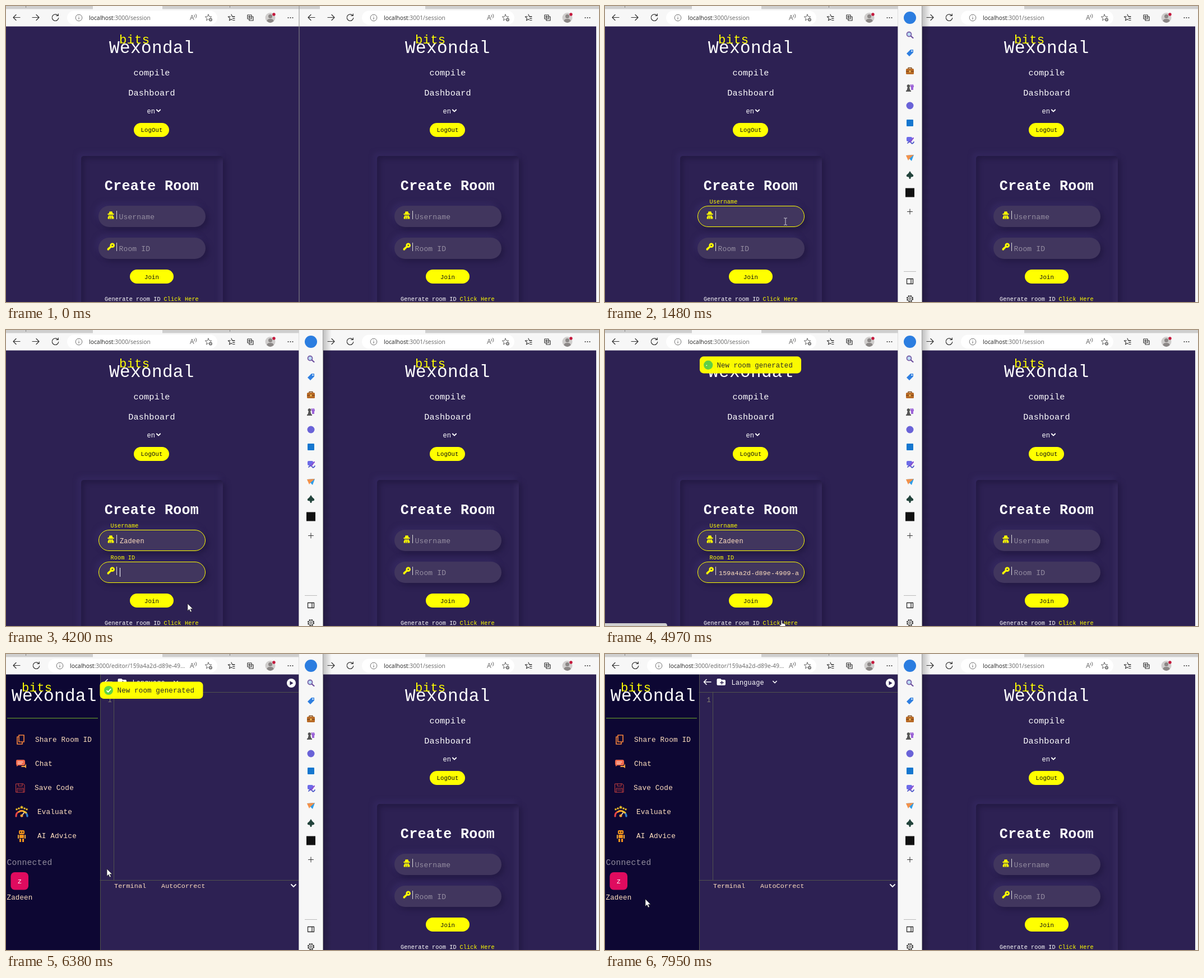
Animation, 1058 px wide and 529 px high, one loop 8 s. Source, as an HTML page:

```html
<!DOCTYPE html>
<html lang="en">
<head>
<meta charset="utf-8">
<title>Create Room</title>
<style>
html, body { margin: 0; width: 1058px; height: 529px; overflow: hidden; background: #2d2153; }
svg { position: absolute; left: 0; top: 0; overflow: hidden; }
text { font-family: "Liberation Mono", "Noto Sans Mono", monospace; letter-spacing: .012em; white-space: pre; }
.ui { font-family: "Open Sans", "Noto Sans", sans-serif; letter-spacing: 0; }
.page { position: absolute; top: 0; width: 523px; height: 529px; overflow: hidden; background: #2d2153; }
.card, .pill { position: absolute; box-sizing: border-box; }
.card { left: 134px; top: 268px; width: 253px; height: 330px; border-radius: 5px;
  box-shadow: inset 5px 5px 8px #241a45, inset -5px -5px 10px #392d61, 5px 5px 10px #241a45, -5px -5px 10px #352960; }
.pill { left: 165px; width: 191px; height: 38px; border-radius: 19px; background: #41365e; border: 1px solid transparent;
  box-shadow: 5px 5px 10px #241a45, -5px -5px 10px #352960; }
</style>
</head>
<body>
<script>
const YELLOW = '#ffff00', PEACH = '#ffdfbf', USER = 'Zadeen', ROOM = '159a4a2d-d89e-4909-a';
const GREY = [150, 143, 162];

const text = (x, y, s, size, fill = '#fff', more = '') =>
  `<text x="${x}" y="${y}" font-size="${size}" fill="${fill}" ${more}>${s}</text>`;
const centred = (x, y, s, size, fill, more = '') => text(x, y, s, size, fill, 'text-anchor="middle" ' + more);
const rect = (x, y, w, h, fill, r = 0, more = '') =>
  `<rect x="${x}" y="${y}" width="${w}" height="${h}" rx="${r}" fill="${fill}" ${more}/>`;
const disc = (x, y, r, fill) => `<circle cx="${x}" cy="${y}" r="${r}" fill="${fill}"/>`;
const fillPath = (d, fill) => `<path d="${d}" fill="${fill}"/>`;
const stroke = (d, color = '#333', width = 1.2) =>
  `<path d="${d}" fill="none" stroke="${color}" stroke-width="${width}" stroke-linecap="round" stroke-linejoin="round"/>`;
const at = (x, y, body) => `<g transform="translate(${x} ${y})">${body}</g>`;
const chevron = (x, y, w = 1.8) => stroke(`M${x - 3.2} ${y - 1.5}l3.2 3.2l3.2-3.2`, '#fff', w);
const star = r => 'M' + Array.from({ length: 10 }, (_, i) => {
  const a = Math.PI * (i / 5 - .5), k = i % 2 ? r * .45 : r;
  return (k * Math.cos(a)).toFixed(2) + ' ' + (k * Math.sin(a)).toFixed(2);
}).join('L') + 'Z';

const logo = x => text(x - 1, 84, 'Wexondal', 31) + text(x + 17, 67, 'bits', 22.2, YELLOW);

const spyIcon = at(187, 374,
  fillPath('M-3.6-3L-2.6-6Q-2-7.5 0-6.6Q2-7.5 2.6-6L3.6-3H5.5V-1H-5.5V-3ZM-4 0H4V2.2L5.3 3V6.5H-5.3V3L-4 2.2Z', YELLOW) +
  stroke('M-2.2 1.3h1.2M1 1.3h1.2M-1.5 4v1.8M1.5 4v1.8', '#41365e', 1));
const keyIcon = at(187, 430,
  `<circle cx="2.7" cy="-2.3" r="2.8" fill="none" stroke="${YELLOW}" stroke-width="3"/>` +
  fillPath('M-1-1L1.5 1.5L-1.3 3.4V4.8H-3V6.4H-6.3V3.6Z', YELLOW));

const sessionPage = (id, left) => `<div class="page" id="${id}" style="left:${left}px">
  <div class="card"></div>
  <div class="pill" style="top:357px"></div><div class="pill" style="top:414px"></div>
  <svg width="523" height="529">${logo(185)}
  ${centred(260, 124, 'compile', 15.2)}${centred(260, 159.5, 'Dashboard', 15.2)}
  ${text(251.5, 191.5, 'en', 12)}${chevron(272, 187)}
  ${rect(228, 209, 63, 25, YELLOW, 12.5)}${centred(260, 225, 'LogOut', 10.6, '#111')}
  ${centred(260, 329, 'Create Room', 25, '#fff', 'font-weight="bold"')}
  ${spyIcon}${keyIcon}${rect(197, 366, 1, 15, '#ddd')}${rect(197, 423, 1, 15, '#ddd')}
  <text class="label" font-size="13">Username</text><text class="label" font-size="13">Room ID</text>
  ${text(203, 381, '', 11.9, PEACH, 'class="value"')}${text(203, 437.5, '', 11.7, PEACH, 'class="value"')}
  ${rect(203, 425, 1, 16, '#fff', 0, 'class="caret" visibility="hidden"')}
  ${rect(221, 471, 78, 25, YELLOW, 12.5)}${centred(260, 487.5, 'Join', 10.6, '#111')}
  ${text(176, 527, 'Generate room ID', 10.2)}${text(281.5, 527, 'Click Here', 10.2, YELLOW)}</svg></div>`;

const menuIcons = [
  stroke('M-3-8H6V4H-3ZM-3-5H-6V8H3V4', '#f0803c', 1.7),
  fillPath('M-6-7H5Q8-7 8-4V0Q8 3 5 3H-4L-7 5V3Q-8 2-8 0V-4Q-8-7-6-7Z', '#f26a4b') +
    fillPath('M2 4H6Q9 4 9 0Q10 1 10 3V8L7 6H1Z', '#f9a53f') + stroke('M-5-3H4M-5 0H2', '#fff', 1),
  stroke('M-8-7H5L7-5V8H-8ZM-4-7V-3H3V-7M-6 8V1H5V8M-4 4H3', '#c9403f', 1),
  [-9, -5, 0, 5, 9].map(x => at(x, Math.abs(x) * .4 - 8, fillPath(star(x ? 2.6 : 3.6), '#ffc928'))).join('') +
    [['M-10 8Q-10 3-7 1', '#e64545'], ['M-5 0Q-2-2 1-1.5', '#ff9d2e'],
     ['M3-1Q6 0 8 2', '#f2c230'], ['M9 4Q10 6 10 8', '#2f80d0']].map(([d, c]) => stroke(d, c, 3.2)).join('') +
    stroke('M0 7L4 2', '#f5d2b0', 2) + disc(0, 7, 2.5, '#f5a13a'),
  rect(-5, -10, 10, 7, '#f7941d', 2) + rect(-4, -2, 8, 6, '#f7941d', 1) + rect(-7, -2, 2, 7, '#f7b03a', 1) +
    rect(5, -2, 2, 7, '#f7b03a', 1) + rect(-4, 5, 3, 6, '#f7941d') + rect(1, 5, 3, 6, '#f7941d') +
    disc(-2, -6.5, 1.2, '#222') + disc(2, -6.5, 1.2, '#222')
];
const menu = [['Share Room ID', 52], ['Chat', 52], ['Save Code', 51], ['Evaluate', 56], ['AI Advice', 56]];

const editor = `<svg id="editor" width="523" height="529">
  ${rect(0, 36, 523, 493, '#2d2153')}${rect(0, 36, 168, 493, '#0d0733')}${logo(11)}
  ${rect(2, 114, 162, 1.3, '#5c8a2c')}
  ${menu.map(([label, x], i) => at(i > 2 ? 28 : 26, 153 + i * 43, menuIcons[i]) + text(x, 157 + i * 43, label, 12.7, PEACH)).join('')}
  ${text(1.5, 377, 'Connected', 14.7, '#8f8a9c')}
  ${rect(8.5, 390, 31.5, 31.5, '#df0b5f', 7)}${centred(24.3, 410, USER[0], 11, '#fff')}${text(1.5, 439, USER, 12.5, PEACH)}
  ${stroke('M168.5 37V529M168 68.5H522M192.5 68V404M168 404.5H522', '#51524e', 1)}
  ${stroke('M189 50H176.5M181 45.5L176.5 50L181 54.5', '#fff', 1.6)}
  ${fillPath('M199.5 46Q199.5 44 201.5 44H206L208 46H213Q215 46 215 48V54Q215 56 213 56H201.5Q199.5 56 199.5 54Z', '#fff')}
  ${stroke('M208.5 48.5V54M205.8 51.2H211.3', '#2d2153', 1.4)}
  ${text(225.5, 54.5, 'Language', 11.9)}${chevron(303, 50, 1.6)}
  ${disc(509, 52, 8, '#fff')}${fillPath('M506.5 48.3V55.7L512.6 52Z', '#2d2153')}
  ${text(181.5, 86, '1', 12, '#85816f')}
  ${text(193, 417.5, 'Terminal', 11.7, PEACH)}${text(277, 417.5, 'AutoCorrect', 11.7, PEACH)}
  ${stroke('M509 412L513 416L517 412', '#fff', 1.8)}</svg>`;

const backArrow = 'M6 0H-6M-1-5L-6 0L-1 5', forwardArrow = 'M-6 0H6M1-5L6 0L1 5';
const collections = 'M-5-5H2V2H-5ZM-2 2V5H5V-2H2M-1.5-3.5V.5M-3.5-1.5H.5';
const addressBar = (x, dx, right, host, path, nested) => {
  const start = nested ? x - 34 : x;
  return at(x + 19, 20.5, stroke(backArrow)) +
    (nested ? '' : at(x + 53 + dx, 20.5, stroke(forwardArrow))) +
    at(start + 88, 20.5, stroke('M4.6-3.4A5.8 5.8 0 1 0 5.8.8M5.3-6.5V-3H1.8')) +
    rect(start + 109, 8.5, right + 377 - start - 109, 25, '#fff', 12.5) +
    `<circle cx="${start + 130}" cy="21" r="5.8" fill="none" stroke="#777"/>` +
    stroke(`M${start + 130} 20.5v3M${start + 130} 18v.1`, '#777') +
    text(start + 148, 25, `${host}<tspan fill="#666">${path}</tspan>`, 10.4, '#222', 'class="ui"') +
    text(right + 328, 25, 'A', 12, '#666', 'class="ui"') + stroke(`M${right + 336} 16q2 2 0 4M${right + 338.5} 14.5q3 3.5 0 7`, '#666', 1) +
    at(right + 361, 21, stroke(star(6), '#666', 1) + disc(4, 3.5, 3.5, '#fff') + disc(4, 3.5, 3, '#666') + stroke('M2.5 3.5h3M4 2v3', '#fff', .8)) +
    at(right + 402, 21, stroke(star(6).replace(/Z$/, ''), '#333', 1.1) + rect(2, -1, 6, 8, '#f7f7f7') + stroke('M2-2h4M2.5 1.3h3.5M3 4.5h3')) +
    at(right + 436, 21, stroke(collections)) +
    at(right + 471.5, 21, disc(0, 0, 9, '#cfcdcc') + disc(0, -2.5, 3.5, '#8b8786') + fillPath('M-6 6Q-6 2 0 2T6 6Q3 9 0 9T-6 6Z', '#8b8786') + disc(6.5, -6, 2.7, '#c4183c')) +
    [-4, 0, 4].map(k => disc(right + 507.5 + k, 21, 1, '#333')).join('');
};
const strip = (x, w, tabX, tabW, marks) => rect(x, 0, w, 36.5, '#f7f7f7') + rect(x, 0, w, 5.5, '#cfcfcf') +
  rect(tabX, 0, tabW, 6, '#f7f7f7') + marks.map(m => rect(m, 0, 1, 3, '#888')).join('');

const sideIcons = [
  [21, disc(0, 0, 11, '#2b7de0')],
  [52, `<circle cx="-1.5" cy="-1.5" r="4" fill="#bcdcf5" stroke="#7b62a8" stroke-width="1.8"/>` + stroke('M2 2L5.5 5', '#6a4a9c', 2.2)],
  [84, fillPath('M-6 1L1-6H6V-1L-1 6Z', '#2f7fe0') + disc(3.5, -3.5, 1.2, '#fff')],
  [116, stroke('M-3-3V-5.5H3V-3', '#7a4a1d', 1.4) + rect(-7, -4, 14, 10, '#b86a26', 1.5) + rect(-7, 0, 14, 1.5, '#84481a') + rect(-1.5, -.5, 3, 3, '#f2c15a')],
  [146, disc(-2.5, -3, 2.8, '#555') + fillPath('M-4-1H-1L1 6H-6ZM-7 5H2V7H-7Z', '#555') + fillPath('M1-6H3V-4H4V-6H6V-4H7V-2L6 0V4H2V0L1-2Z', '#9c63d8')],
  [178, disc(0, 0, 6.5, '#6a63d8')],
  [209, rect(-6, -6, 12, 12, '#1677cf', 1)],
  [240, rect(-6, -6, 10, 8, '#6d6be8', 2) + stroke('M-4 5Q0 0 2 4T7 3', '#4a55c8', 1.8) + stroke('M0 3L6-4', '#8a4fd0', 2.2)],
  [271, fillPath('M-7-4L7-5L3 6L-1 2Z', '#2f9de8') + fillPath('M-7-4L7-5L-1 2L-3 5Z', '#f2914a')],
  [302, fillPath('M0-7Q2-3 6 0Q7 4 2 3.5L1 7H-1L-2 3.5Q-7 4-6 0Q-2-3 0-7Z', '#23443c')],
  [333.5, rect(-8, -8, 16, 16, '#111')],
  [367.5, stroke('M-4.5 0H4.5M0-4.5V4.5', '#333', 1)],
  [492, stroke('M-5.5-4.5H5.5V4.5H-5.5ZM2-4.5V4.5', '#333', 1.3)],
  [523, `<circle r="5" fill="none" stroke="#333" stroke-width="2.2" stroke-dasharray="2.4 1.53"/><circle r="4.2" fill="#f7f7f7" stroke="#333"/><circle r="1.7" fill="none" stroke="#333"/>`]
];
const sidebar = `<g id="sidebar"><rect x="566" width="15" height="529" fill="url(#shade)"/>${rect(522.5, 0, 43, 529, '#f7f7f7')}
  ${rect(565, 0, 1, 529, '#a0a0a0')}${rect(533, 474, 22, 1, '#bbb')}${sideIcons.map(([y, body]) => at(544, y, body)).join('')}</g>`;

const toast = `<g id="toast">${rect(167.5, 49.5, 184, 30.5, YELLOW, 7)}
  <g id="tick">${disc(0, 0, 8, '#61d345')}</g>
  <path id="check" d="M179.5 65.2l2.7 2.7l5-5.6" pathLength="1" stroke-dasharray="1 2" fill="none" stroke="#fff" stroke-width="1.8"/>
  ${text(198.5, 69, 'New room generated', 12.5, '#2b2b2b')}</g>`;

const pointers = {
  arrow: `<path d="M0 0V13L3 10.2L5 15L7.3 14L5.2 9.4H9.3Z" fill="#fff" stroke="#222" stroke-width=".7"/>`,
  beam: stroke('M-2.5-6H-.7L0-5.3L.7-6H2.5M0-5.3V5.6M-2.5 6.3H-.7L0 5.6L.7 6.3H2.5', '#d5d2dc', 1),
  hand: `<path d="M-1 0Q.2-1 1.2 0V5L6 6Q7.5 6.5 7 9L6 13H0L-4 8Q-3.8 6.5-1 8Z" fill="#fff" stroke="#222" stroke-width=".8"/>`
};

document.body.innerHTML = `<div style="position:absolute;left:0;top:0;width:1058px;height:529px;overflow:hidden">
  ${sessionPage('right', 528)}
  <svg width="1058" height="529">${rect(1053, 0, 5, 529, '#f4f4f4')}${strip(523, 535, 560, 188, [])}
    ${addressBar(526, 1, 530, 'localhost', ':3001/session')}</svg>
  ${sessionPage('left', 0)}${editor}
  <svg width="1058" height="529"><defs><linearGradient id="shade"><stop stop-color="#000" stop-opacity=".22"/><stop offset="1" stop-opacity="0"/></linearGradient></defs>
    ${toast}${strip(0, 523, 155, 124, [35, 399])}
    <g id="sessionBar">${addressBar(0, 0, 0, 'localhost', ':3000/session')}</g>
    <g id="editorBar">${addressBar(0, 0, 0, 'localhost', ':3000/editor/159a4a2d-d89e-49...', true)}</g>
    ${rect(522.5, 0, 1, 529, '#8d8d8d')}
    ${sidebar}<path id="status" d="M0 524H107Q111 524 111 529H0Z" fill="#cfcfcf"/>
    <g id="pointer">${Object.entries(pointers).map(([k, v]) => `<g id="${k}">${v}</g>`).join('')}</g></svg></div>`;

const $ = id => document.getElementById(id);
const clamp = v => Math.min(1, Math.max(0, v));
const mix = (a, b, p) => a + (b - a) * p;
const show = (id, on) => { $(id).style.display = on ? '' : 'none'; };

const bezier = (x1, y1, x2, y2) => p => {
  const curve = (a, b, u) => 3 * a * u * (1 - u) ** 2 + 3 * b * u * u * (1 - u) + u ** 3;
  let lo = 0, hi = 1;
  for (let i = 0; i < 24; i++) {
    const mid = (lo + hi) / 2;
    if (curve(x1, x2, mid) < p) lo = mid; else hi = mid;
  }
  return p <= 0 ? 0 : p >= 1 ? 1 : curve(y1, y2, hi);
};
const ease = bezier(.25, .1, .25, 1), easeEnter = bezier(.21, 1.02, .73, 1);
const easeExit = bezier(.06, .71, .55, 1), easePop = bezier(.175, .885, .32, 1.275);

// time, x, y, pointer shape while heading to the next stop
const stops = [
  [0, 974, 531, 'arrow'], [50, 974, 531, 'arrow'], [640, 350, 390, 'beam'], [760, 322, 385, 'beam'], [3740, 322, 385, 'beam'],
  [3880, 324, 411, 'beam'], [4020, 325, 456, 'arrow'], [4200, 324, 489, 'arrow'], [4520, 318, 517, 'hand'], [4700, 315, 519, 'hand'],
  [5020, 315, 519, 'hand'], [5130, 306, 508, 'arrow'], [5280, 286, 492, 'hand'], [5480, 264, 484, 'hand'],
  [5800, 264, 484, 'arrow'], [6340, 180, 384, 'arrow'], [6570, 180, 384, 'arrow'], [7180, 31, 435, 'arrow'],
  [7360, 34, 424, 'arrow'], [7950, 72, 438, 'arrow'], [8000, 72, 438, 'arrow']
];
const keyTimes = [1730, 2040, 2290, 2540, 2670, 2850];
const focusTimes = [900, 3060], NAVIGATE = 5800, TOAST_IN = 4745, TOAST_OUT = 6750;

function drawFields(pageId, t) {
  const page = $(pageId), pills = page.querySelectorAll('.pill');
  page.querySelectorAll('.label').forEach((label, i) => {
    const p = ease(clamp((t - focusTimes[i]) / 500));
    const color = GREY.map((c, k) => Math.round(mix(c, [255, 255, 0][k], p)));
    label.setAttribute('transform', `translate(${mix(201.5, 186.5, p)} ${mix(381, 352.5, p) + i * 57}) scale(${mix(1, .785, p)})`);
    label.setAttribute('fill', `rgb(${color})`);
    pills[i].style.borderColor = `rgba(255,255,0,${p})`;
  });
}

function drawToast(t) {
  const age = t - TOAST_IN, shown = easeEnter(clamp(age / 350)), gone = easeExit(clamp((t - TOAST_OUT) / 400));
  const scale = mix(.6, 1, shown) * mix(1, .6, gone), dy = -61 * (1 - shown) - 46 * gone;
  show('toast', age >= 0 && gone < 1);
  $('toast').setAttribute('transform', `translate(259.5 ${65 + dy}) scale(${scale}) translate(-259.5 -65)`);
  $('toast').setAttribute('opacity', mix(.5, 1, shown) * (1 - gone));
  $('tick').setAttribute('transform', `translate(183 65) scale(${easePop(clamp((age - 100) / 300))})`);
  const drawn = clamp((age - 200) / 200);
  $('check').setAttribute('stroke-dashoffset', 1 - drawn);
  $('check').setAttribute('visibility', drawn ? 'visible' : 'hidden');
}

function drawPointer(t) {
  const i = stops.findIndex((s, k) => k == stops.length - 2 || t < stops[k + 1][0]);
  const [t0, x0, y0, shape] = stops[i], [t1, x1, y1] = stops[i + 1];
  const p = clamp((t - t0) / (t1 - t0)), q = p * p * (3 - 2 * p);
  $('pointer').setAttribute('transform', `translate(${mix(x0, x1, q)} ${mix(y0, y1, q)})`);
  Object.keys(pointers).forEach(k => show(k, k == shape));
}

function draw(t) {
  const inEditor = t >= NAVIGATE, filled = t >= TOAST_IN;
  show('left', !inEditor);
  show('sessionBar', !inEditor);
  show('editor', inEditor);
  show('editorBar', inEditor);
  show('sidebar', t >= 890);
  show('status', t >= 4640 && t < 5200);
  drawFields('left', t);
  const [name, room] = $('left').querySelectorAll('.value');
  name.textContent = USER.slice(0, keyTimes.filter(k => t >= k).length);
  room.textContent = filled ? ROOM : '';
  const sinceFocus = t - focusTimes[1];
  const caretOn = sinceFocus >= 0 && t < 4640 && sinceFocus % 1060 < 530;
  $('left').querySelector('.caret').setAttribute('visibility', caretOn ? 'visible' : 'hidden');
  drawToast(t);
  drawPointer(t);
}

drawFields('right', 0);
const began = performance.now();
(function tick() {
  draw((performance.now() - began) % 8000);
  requestAnimationFrame(tick);
})();
</script>
</body>
</html>
```
